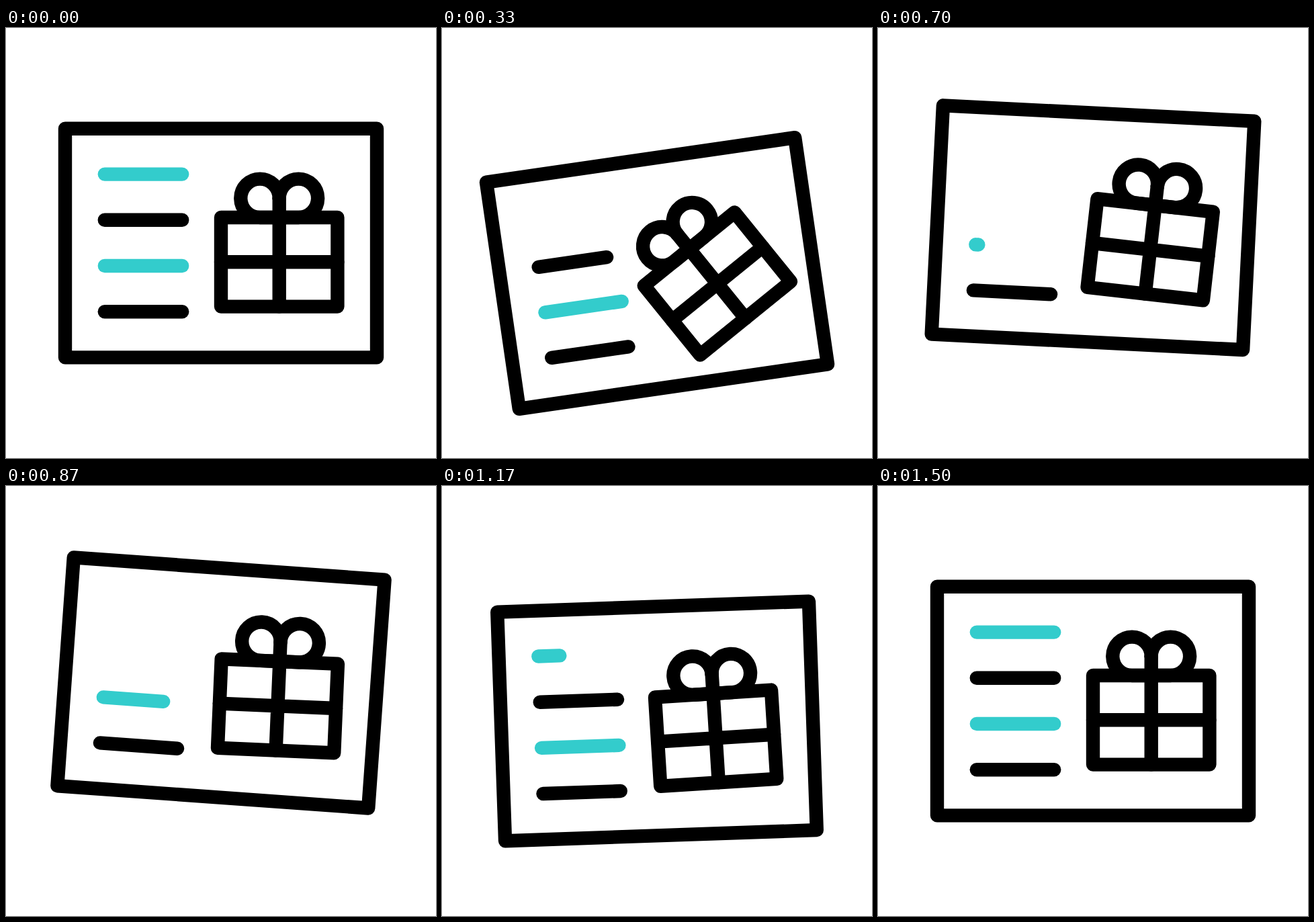
These frames come from a looping animation (640x640 px, 2000 ms). An HTML page:

```html
<!DOCTYPE html>
<html lang="en">
<head>
<meta charset="utf-8">
<title>Gift card</title>
<style>
  html, body { margin: 0; width: 100%; height: 100%; overflow: hidden; background: #fff; }
  svg { display: block; width: 100%; height: 100%; }
  g { fill: none; stroke: #000; stroke-width: 20.4; stroke-linecap: round; stroke-linejoin: round; }
  .teal { stroke: #3cc; }
</style>
</head>
<body>
<svg viewBox="0 0 640 640">
  <g id="card">
    <rect x="88" y="149.7" width="464" height="340.7"/>
    <path class="line teal"/>
    <path class="line"/>
    <path class="line teal"/>
    <path d="M146.8 422.2h115.4"/>
    <g id="gift">
      <rect x="320" y="282" width="173.4" height="132.6"/>
      <path d="M320 348.3h173.4M406.7 254V414.6"/>
      <path d="M406.7 282H378a28.7 28.7 0 1 1 28.7 -28.7"/>
      <path d="M406.7 282H435.4a28.7 28.7 0 1 0 -28.7 -28.7"/>
    </g>
  </g>
</svg>
<script>
const LOOP = 2000, STEP = LOOP / 60, END = 1487;

const card = document.getElementById('card');
const gift = document.getElementById('gift');
const lines = document.querySelectorAll('.line');

// Progress from 0 to 1, eased at both ends.
function ease(t, from, to) {
  const u = Math.min(1, Math.max(0, (t - from) / (to - from)));
  return u * u * (3 - 2 * u);
}

// Swings from rest through each peak and back to rest.
function sway(t, beats, peaks) {
  let value = 0;
  [...peaks, 0].forEach((peak, i) => {
    value += (peak - value) * ease(t, beats[i], beats[i + 1]);
  });
  return value;
}

const cardBeats = [13, 450, 777, 1177, END];
const giftBeats = [0, 1, 2, 3, 4, 5].map(i => Math.min(i * LOOP / 6, END));

// Lines are wiped from the top down, then written again from the bottom up.
function lineLength(t, i) {
  const wipe = 67 + 222 * i, write = 707 + 190 * (2 - i);
  return 115.4 * (1 - ease(t, wipe, wipe + 213) + ease(t, write, write + 230));
}

function draw(now) {
  const t = Math.floor((now % LOOP + 5) / STEP) * STEP;
  const drop = sway(t, cardBeats, [54.5, -35.5, 30]);
  const tilt = sway(t, cardBeats, [-10, 5, -2]);
  const spin = sway(t, giftBeats, [-30.8, 3.8, -4.6, 1.4]);
  card.setAttribute('transform', `translate(0 ${drop}) rotate(${tilt} 320 320)`);
  gift.setAttribute('transform', `rotate(${spin} 406.7 348.3)`);
  lines.forEach((line, i) => {
    const length = lineLength(t, i);
    line.setAttribute('d', length > 0.1 ? `M146.8 ${217.6 + 68.2 * i}h${length}` : '');
  });
}

const start = performance.now();
function tick() {
  draw(performance.now() - start);
  requestAnimationFrame(tick);
}
tick();
</script>
</body>
</html>
```
